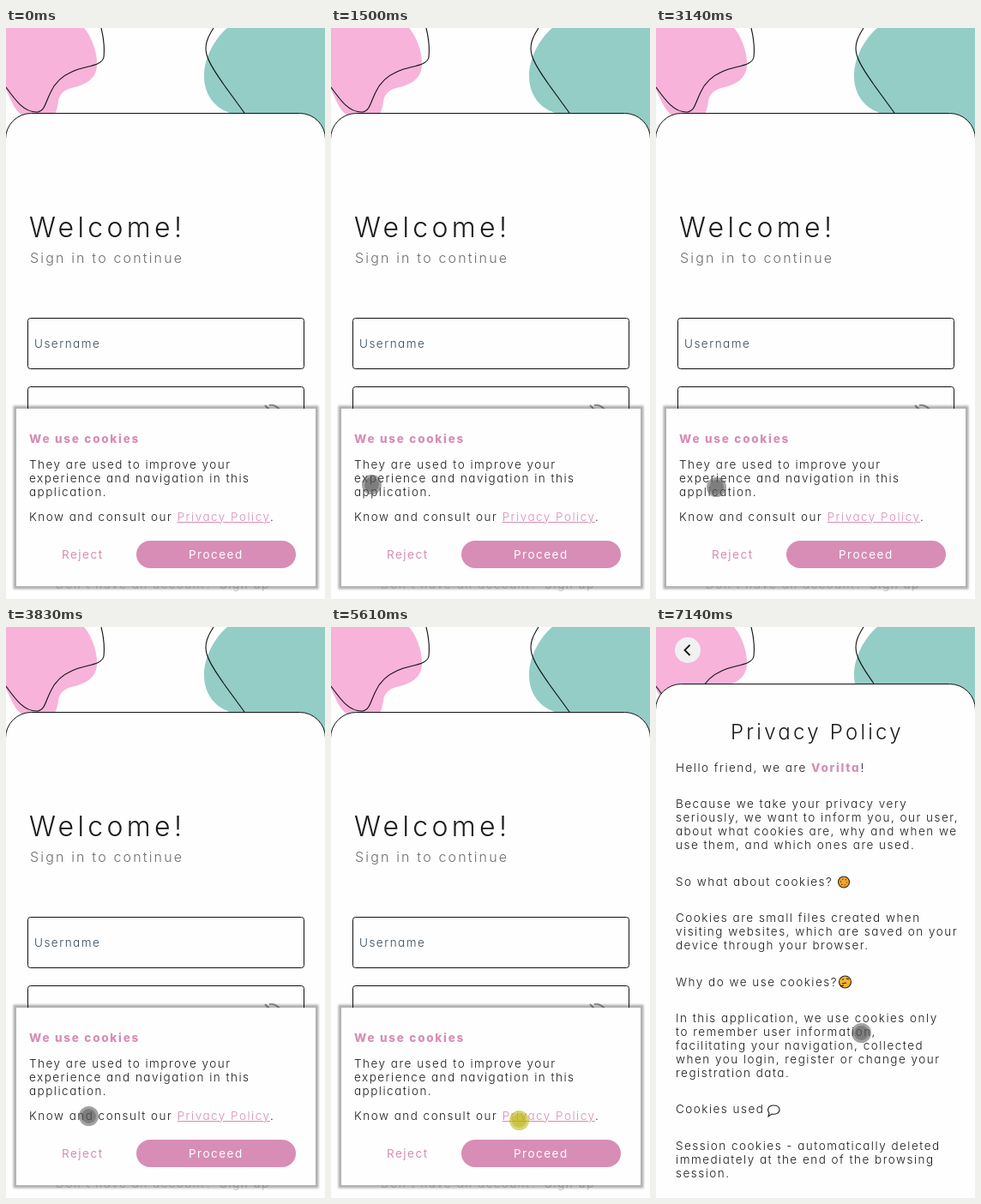
These frames come from a looping animation (372 by 666 pixels, 8000 ms). An HTML page:

```html
<!DOCTYPE html>
<html lang="en">
<head>
<meta charset="utf-8">
<title>Cookie notice</title>
<style>
:root { --rose: #d78db6; --ink: #1a1a1a; --loop: 8s; }
html, body { margin: 0; width: 100%; height: 100%; overflow: hidden; background: #fefefe; }
body { position: relative; color: var(--ink); }
svg { position: absolute; left: 0; top: 0; width: 372px; height: 666px; }
text, .copy {
  font: 300 13.5px/16px Inter, "Open Sans", sans-serif;
  font-feature-settings: "cv11";
  font-optical-sizing: none;
  letter-spacing: .11em;
  fill: currentColor;
}
.copy { position: absolute; white-space: nowrap; }
.copy p { margin: 0 0 var(--gap); }
.copy a { color: var(--rose); text-decoration: underline; }
.copy b, .strong { font-weight: 800; letter-spacing: .13em; color: var(--rose); }
.rose { color: var(--rose); }
.medium { font-weight: 400; }
.hero, .sub, .title { letter-spacing: .135em; }
.hero { font-size: 32px; }
.sub { font-size: 16px; color: #6d6d6a; }
.title { font-size: 24px; }
.faint { color: #ccc; }
.line { fill: none; stroke: #111; stroke-width: 1.1; }
.sheet { fill: #fefefe; stroke: #111; }
.halo { fill: none; stroke: rgba(0, 0, 0, .3); stroke-width: 7; filter: blur(1.3px); }

#notice { left: 27px; top: 501px; --gap: 13px; }
#terms { left: 23px; top: 156px; --gap: 26.4px; }

#login { animation: leave var(--loop) step-end infinite; }
#policy { animation: enter var(--loop) step-end infinite; }
@keyframes leave { 0% { visibility: visible } 71%, 100% { visibility: hidden } }
@keyframes enter { 0% { visibility: hidden } 71%, 100% { visibility: visible } }

#cursor {
  position: absolute; left: -11.5px; top: -11.5px;
  width: 23px; height: 23px; border-radius: 50%;
  animation: glide var(--loop) infinite, press var(--loop) step-end infinite;
}
#cursor::before, #cursor::after {
  content: ""; position: absolute; inset: 0; border-radius: 50%;
  background: currentColor; opacity: .55;
}
#cursor::after { inset: 3px; opacity: .45; }
@keyframes press {
  0% { visibility: hidden; color: #555 }
  10.75% { visibility: visible; color: #555 }
  70.125% { visibility: visible; color: #b9b208 }
  71%, 100% { visibility: visible; color: #555 }
}
@keyframes glide {
  0%, 10.75% { transform: translate(268px, 644px); animation-timing-function: ease-out }
  18.75% { transform: translate(47px, 532px) }
  22.25%, 25.5% { transform: translate(39px, 525px); animation-timing-function: linear }
  31% { transform: translate(126px, 521px); animation-timing-function: ease-in-out }
  39.25% { transform: translate(70px, 535px); animation-timing-function: ease-in-out }
  47.875% { transform: translate(96px, 570px); animation-timing-function: ease-in-out }
  61.75%, 84.25% { transform: translate(219px, 575px); animation-timing-function: ease-in-out }
  89.25%, 100% { transform: translate(239px, 473px) }
}
</style>
</head>
<body>
<svg viewBox="0 0 372 666">
  <path fill="#f7b3da" d="M0 0H91C100 10 107 30 106 44C105 60 92 66 80 69C66 72 62 78 61 86C60 94 58 98 57 101H18C10 96 6 84 0 72Z"/>
  <path fill="#93cdc6" d="M258 0C242 14 231 36 231 56C231 78 244 96 268 101L372 130V0Z"/>
  <path class="line" d="M111 0C114 12 115 24 114 34C112 45 91 44 77 51C63 57 56 66 52 75C46 87 45 97 37 98C21 99 10 83 0 69"/>
  <path class="line" d="M242 0C235 11 231 20 234 31C237 43 246 54 254 66L278 99"/>
</svg>

<div id="login">
  <svg viewBox="0 0 372 666">
    <rect class="sheet" x="-.5" y="99.5" width="373" height="600" rx="30"/>
    <text class="hero" x="27" y="244">Welcome!</text>
    <text class="sub" x="28" y="274">Sign in to continue</text>
    <rect class="sheet" x="25.5" y="338.5" width="322" height="59" rx="3"/>
    <text x="33" y="373" color="#34495a">Username</text>
    <rect class="sheet" x="25.5" y="418.5" width="322" height="59" rx="3"/>
    <path d="M302 440L318 456M307 440Q314 438 321 447" fill="none" stroke="#999" stroke-width="2"/>
    <text class="faint" x="58" y="654">Don't have an account?</text>
    <text class="faint medium" x="249" y="654">Sign up</text>
    <rect class="halo" x="12" y="444" width="349" height="207"/>
    <rect x="12" y="444" width="349" height="207" fill="#fefefe"/>
    <text class="strong" x="27" y="484">We use cookies</text>
    <text class="rose medium" x="65" y="619">Reject</text>
    <rect x="152" y="598" width="186" height="32" rx="16" fill="#d78db6"/>
    <text class="medium" x="213" y="619" color="#fff">Proceed</text>
  </svg>
  <div class="copy" id="notice">
    <p>They are used to improve your<br>experience and navigation in this<br>application.</p>
    <p>Know and consult our <a>Privacy Policy</a>.</p>
  </div>
</div>

<div id="policy">
  <svg viewBox="0 0 372 666">
    <rect class="sheet" x="-.5" y="66.5" width="373" height="640" rx="30"/>
    <circle cx="37" cy="27" r="15" fill="#f1f1f1"/>
    <path d="M39.5 21L33.5 27L39.5 33" fill="none" stroke="#111" stroke-width="1.8"/>
    <text class="title" x="87" y="131">Privacy Policy</text>
    <g stroke="#222" stroke-width="1.1">
      <circle cx="219" cy="297.5" r="6.5" fill="#f5a52c"/>
      <circle cx="219" cy="297.5" r="3.5" fill="none" stroke-dasharray="1 2.6"/>
      <circle cx="220.5" cy="414" r="7" fill="#f7b32d"/>
      <path d="M217 411h2M222 410l3 1M217 416l5-1M215 419l4-1" fill="none"/>
      <path d="M132 567C129 563 131 558 137 558C142 558 144 560 144 563C144 567 140 569 135 568L131 571Z" fill="#fefefe"/>
    </g>
  </svg>
  <div class="copy" id="terms">
    <p>Hello friend, we are <b>Vorilta</b>!</p>
    <p>Because we take your privacy very<br>seriously, we want to inform you, our user,<br>about what cookies are, why and when we<br>use them, and which ones are used.</p>
    <p>So what about cookies?</p>
    <p>Cookies are small files created when<br>visiting websites, which are saved on your<br>device through your browser.</p>
    <p>Why do we use cookies?</p>
    <p>In this application, we use cookies only<br>to remember user information,<br>facilitating your navigation, collected<br>when you login, register or change your<br>registration data.</p>
    <p>Cookies used</p>
    <p>Session cookies - automatically deleted<br>immediately at the end of the browsing<br>session.</p>
  </div>
</div>

<div id="cursor"></div>
</body>
</html>
```
